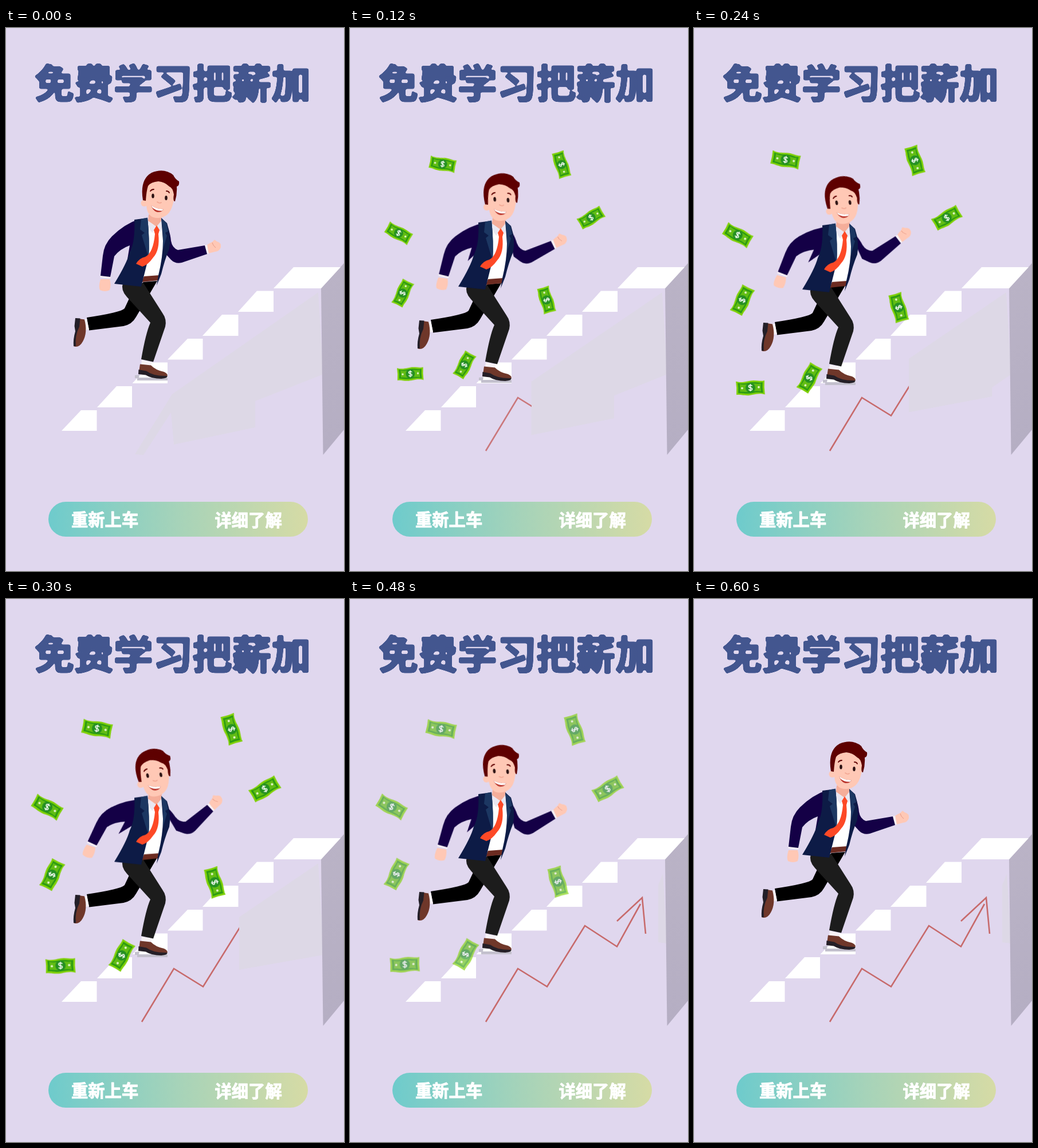
These frames come from a looping animation (590x949 px, 0.75 s). An HTML page:

```html
<!DOCTYPE html>
<html lang="zh-CN">
<head>
<meta charset="utf-8">
<title>免费学习把薪加</title>
<style>
  html, body { margin: 0; width: 100%; height: 100%; overflow: hidden; background: #e0d7ee; }
  .layer { position: absolute; left: 0; top: 0; width: 590px; height: 949px; display: block; }
  text { font-family: "Noto Sans CJK SC", "Noto Sans CJK", sans-serif; font-weight: 900; stroke-linejoin: round; }
  .title { font-size: 68.9px; fill: #43568f; stroke: #43568f; stroke-width: 3; filter: url(#goo); }
  .label { font-size: 29.3px; fill: #fff; stroke: #fff; stroke-width: 1; }

  .veil { background: #ddd8e6; animation: veil .75s infinite; }
  .chart { fill: none; stroke: #c76a6b; stroke-width: 2.6; animation: wipe .75s infinite, ink .75s infinite; }
  .sway { animation: sway .75s infinite; }
  .bill { animation: fly .75s infinite, fade .75s infinite; }

  .legs { --y: 11px; --r: 0deg; }
  .torso { --y: 13.5px; --r: 0deg; }
  .head { --y: 14.3px; --r: -13.5deg; transform-origin: 262px 338px; }
  .arm-l { --y: 14.3px; --r: 20deg; transform-origin: 224px 352px; }
  .arm-r { --y: 14.3px; --r: -31deg; transform-origin: 283px 355px; }

  /* every segment advances in 30 ms steps */
  @keyframes sway {
    0% { transform: translate(0, 0) rotate(0deg); animation-timing-function: steps(11); }
    44% { transform: translate(0, var(--y)) rotate(var(--r)); animation-timing-function: steps(9); }
    80%, 100% { transform: translate(0, 0) rotate(0deg); }
  }
  @keyframes fly {
    0% {
      transform: translate(calc(var(--x) - var(--dx)), calc(var(--y) - var(--dy))) rotate(var(--r)) scale(.755);
      animation-timing-function: steps(13);
    }
    52% {
      transform: translate(var(--x), var(--y)) rotate(var(--r)) scale(1);
      animation-timing-function: steps(7);
    }
    80%, 100% {
      transform: translate(calc(var(--x) - .6 * var(--dx)), calc(var(--y) - .6 * var(--dy))) rotate(var(--r)) scale(.853);
    }
  }
  @keyframes fade {
    0% { opacity: 0; animation-timing-function: steps(2); }
    8%, 56% { opacity: 1; animation-timing-function: steps(6); }
    80%, 100% { opacity: 0; }
  }
  @keyframes wipe {
    0% { clip-path: inset(0 360px 0 0); animation-timing-function: steps(2); }
    8% { clip-path: inset(0 300px 0 0); animation-timing-function: steps(4); }
    24% { clip-path: inset(0 247px 0 0); animation-timing-function: steps(4); }
    40% { clip-path: inset(0 183px 0 0); animation-timing-function: steps(3); }
    52% { clip-path: inset(0 93px 0 0); animation-timing-function: steps(2); }
    60%, 100% { clip-path: inset(0 50px 0 0); }
  }
  @keyframes ink {
    0% { opacity: .55; animation-timing-function: steps(2); }
    8% { opacity: .75; animation-timing-function: steps(4); }
    24%, 100% { opacity: 1; }
  }
  @keyframes veil {
    0% {
      clip-path: polygon(290px 640px, 545px 462px, 554px 605px, 435px 652px, 435px 698px, 293px 728px, 288px 672px, 240px 746px, 225px 745px);
      animation-timing-function: steps(2);
    }
    8% {
      clip-path: polygon(290px 636px, 545px 462px, 554px 605px, 435px 650px, 435px 698px, 290px 728px, 290px 700px, 290px 680px, 290px 660px);
      animation-timing-function: steps(4);
    }
    24% {
      clip-path: polygon(343px 600px, 545px 462px, 554px 605px, 487px 635px, 487px 666px, 343px 695px, 343px 680px, 343px 660px, 343px 640px);
      animation-timing-function: steps(4);
    }
    40% {
      clip-path: polygon(407px 556px, 545px 462px, 554px 605px, 554px 621px, 554px 622px, 407px 648px, 407px 630px, 407px 610px, 407px 590px);
      animation-timing-function: steps(3);
    }
    52% {
      clip-path: polygon(497px 512px, 545px 465px, 554px 600px, 554px 601px, 554px 602px, 497px 612px, 497px 590px, 497px 570px, 497px 550px);
      animation-timing-function: steps(2);
    }
    60%, 100% {
      clip-path: polygon(538px 500px, 546px 480px, 554px 600px, 554px 601px, 554px 602px, 538px 600px, 538px 580px, 538px 560px, 538px 540px);
    }
  }
</style>
</head>
<body>
<div class="layer veil"></div>

<svg class="layer chart" viewBox="0 0 590 949">
  <path d="M237 739L293 646 344 677.5 410 571 466 607.5 507 533M466 563L510 522 516 585"/>
</svg>

<svg class="layer" viewBox="0 0 590 949">
  <defs>
    <filter id="goo" x="-5%" y="-10%" width="110%" height="120%" color-interpolation-filters="sRGB">
      <feGaussianBlur stdDeviation="1.7"/>
      <feColorMatrix values="1 0 0 0 0  0 1 0 0 0  0 0 1 0 0  0 0 0 7 -3"/>
    </filter>
    <linearGradient id="pill">
      <stop offset="0" stop-color="#6ecbcc"/>
      <stop offset=".5" stop-color="#a6d3b9"/>
      <stop offset="1" stop-color="#d6dba5"/>
    </linearGradient>
    <linearGradient id="wall" x2="0" y2="1">
      <stop offset="0" stop-color="#bab3c6"/>
      <stop offset="1" stop-color="#b5aec3"/>
    </linearGradient>
    <path id="note" d="M-28-12C-14-8-4-14 6-14S20-12 27-14Q26 0 28 13C14 9 4 15-6 15S-20 13-27 14Q-26 0-28-12Z"/>
    <g id="bill">
      <use href="#note" fill="#7fd008"/>
      <use href="#note" fill="#2b9a12" transform="scale(.87 .76)"/>
      <use href="#note" fill="#62bd14" transform="scale(.74 .56)"/>
      <ellipse rx="9.5" ry="9.5" fill="#259022"/>
      <circle cx="-16" cy="1" r="2.1" fill="#e6f6cd"/>
      <circle cx="16" cy="-1" r="2.1" fill="#e6f6cd"/>
      <path d="M3.6-3.4Q2.4-5 0-5C-4.6-5-4.6-.6 0 0 4.6.6 4.6 5 0 5Q-2.4 5-3.6 3.4M0-7V7" fill="none" stroke="#fff" stroke-width="1.7"/>
    </g>
  </defs>

  <text class="title" x="50" y="123">免费学习把薪加</text>

  <path fill="url(#wall)" d="M550 455L590 411V702L553.500 746Z"/>
  <path fill="#fff" d="M467 455L502 418H584L550 455ZM405 496L438 459.500H467V496ZM343 538L377 501H405.500V538ZM282 579.500L317 543H343.500V579.500ZM220.500 621L255 584.500H282V621ZM159 663L193 626H220V663ZM97 704L131 668H158.500V704Z"/>

  <g class="sway legs">
    <path fill="#c3c0cd" d="M225 607L233 606 232 611H282V616H229V612H225Z"/>
    <path fill="#000" d="M222 458L207 490Q201 497 141 506L145 528.500 205 521Q220 518 227 505L264 442 240 444Z"/>
    <path fill="#f6f1f5" d="M137 510L141 508 145 527 139 528Z"/>
    <path fill="#6f372a" d="M127 508L137 509.500Q143 532 134 548 128 559 118.500 556.500 118 545 122 532Z"/>
    <path fill="#231f28" d="M121 507L129.500 507.500 128 522Q120 538 122 556L118 556Q117 544 121 530L119.500 521Z"/>
    <path fill="#f6f1f5" d="M237 580L255 584 253 590 236 588Z"/>
    <path fill="#1c1c1c" d="M204 446Q200 458 211 470L252 515Q244 533 236 579L257 583.500 278 522Q281 509 273 498L240 446Z"/>
    <path fill="#6f372a" d="M234 587.500L253 589.500Q261 598 276 601 284 605 281 609L262 611Q248 604 232 602Z"/>
    <path fill="#251f27" d="M231.500 597L245 599.500Q258 609 281.500 608 283 612 271 613 254 613 244 606.500L231 605Z"/>
  </g>

  <g class="sway arm-l">
    <path fill="#ffc8b5" d="M165 439L181 439Q184 449 181 458 173 462 164 458 161 451 165 439Z"/>
    <path fill="#f6f1f5" d="M165 432H183L182.500 438 164.500 436Z"/>
    <path fill="#140046" d="M232 334Q206 343 185 364 171 378 169 398L165 433 182 435 189 399Q199 386 216 380L212 404 236 376Z"/>
  </g>

  <g class="sway arm-r">
    <path fill="#ffc8b5" d="M351 379Q355 376 360 374L364 370 368 373Q376 375 375 383 373 390 365 391L353 394Z"/>
    <path fill="none" stroke="#e89a86" d="M360 375Q361 380 366 384"/>
    <path fill="#f6f1f5" d="M346 380L351 379 354 394 349 395Z"/>
    <path fill="#140046" d="M276 340Q286 350 288 372 290 384 300 388L347 380 351 395 307 410Q296 413 288 405L278 394Z"/>
  </g>

  <g class="sway torso">
    <path fill="#fff" d="M246 340L273 338 275 380 267 433 240 435Z"/>
    <path fill="#6c2b21" d="M241 434L268 432 265 441 237 444Z"/>
    <path fill="#f5ae9a" d="M249 326L272 328 270 341 262 347 248 337Z"/>
    <path fill="#e9e7f2" d="M248 337L262 347 255 358 247 345ZM271 337L263 347 270 357 273 345Z"/>
    <path fill="#0d1b46" d="M224 335L247 332Q251 370 249 400L236 452 189 447Q211 411 216 392 226 372 224 335Z"/>
    <path fill="#1c3762" d="M236 333.500L247 331.500Q251 370 249 402L237 362 242 358 234 352Z"/>
    <path fill="#0d1b46" d="M271 332L281 341Q289 365 285 386 277 405 271 430L263 450 266 432Q274 400 274 372Z"/>
    <path fill="#1c3762" d="M271 332L280 341 283 355 278 358 281 363 274 386Q275 360 271 332Z"/>
    <path fill="#fd4926" d="M263 345L268 353 266 360Q269 388 257 401 248 414 238 417L227 412Q233 402 243 400 257 393 260 360L258 353Z"/>
  </g>

  <g class="sway head">
    <circle cx="241.500" cy="306" r="6" fill="#ffc8b5"/>
    <path fill="#ffc8b5" d="M245 270Q242 298 246 317 250 333 266 332 285 331 291 309 298 287 294 270L270 260Z"/>
    <path fill="#5e0000" d="M239 301Q233 265 254 253 276 244 292 257 295 264 302 268 303 276 298 277 299 290 295 303 291 303 293 291 291 279 285 277 277 269 266 268 253 269 248 276 245 285 244 302Z"/>
    <ellipse cx="256.500" cy="293.500" rx="2.300" ry="4" fill="#2a1112"/>
    <ellipse cx="279.500" cy="297" rx="2.300" ry="4" fill="#2a1112"/>
    <path fill="none" stroke="#5e0000" stroke-width="1.800" stroke-linecap="round" d="M252 285Q254 282 258 282M280 285Q284 285 285 288"/>
    <path fill="none" stroke="#f2a894" stroke-width="1.800" stroke-linecap="round" d="M264 304Q268 307 271 305"/>
    <path fill="#b9332a" d="M253.500 310Q264 317 275 316.500 272 323 263 321.500 256 319 253.500 310Z"/>
    <path fill="#fff" d="M253.500 310Q264 317 275 316.500L272.500 319.500Q262 320 255.500 314Z"/>
  </g>

  <use class="bill" href="#bill" style="--x:157.500px;--y:220.500px;--dx:-6px;--dy:-25px;--r:13deg"/>
  <use class="bill" href="#bill" style="--x:406px;--y:222px;--dx:53px;--dy:-24px;--r:75deg"/>
  <use class="bill" href="#bill" style="--x:467px;--y:332px;--dx:67px;--dy:1px;--r:-28deg"/>
  <use class="bill" href="#bill" style="--x:65.500px;--y:366px;--dx:-28px;--dy:11px;--r:31deg"/>
  <use class="bill" href="#bill" style="--x:74.500px;--y:491px;--dx:-25px;--dy:40px;--r:-62deg"/>
  <use class="bill" href="#bill" style="--x:375px;--y:505px;--dx:46px;--dy:43px;--r:76deg"/>
  <use class="bill" href="#bill" style="--x:203px;--y:640px;--dx:5px;--dy:74px;--r:-59deg"/>
  <use class="bill" href="#bill" style="--x:90px;--y:659px;--dx:-22px;--dy:79px;--r:0deg"/>

  <rect x="74" y="828" width="453" height="61" rx="30.500" fill="url(#pill)"/>
  <text class="label" x="114" y="870">重新上车</text>
  <text class="label" x="364.500" y="871">详细了解</text>
</svg>
</body>
</html>
```
